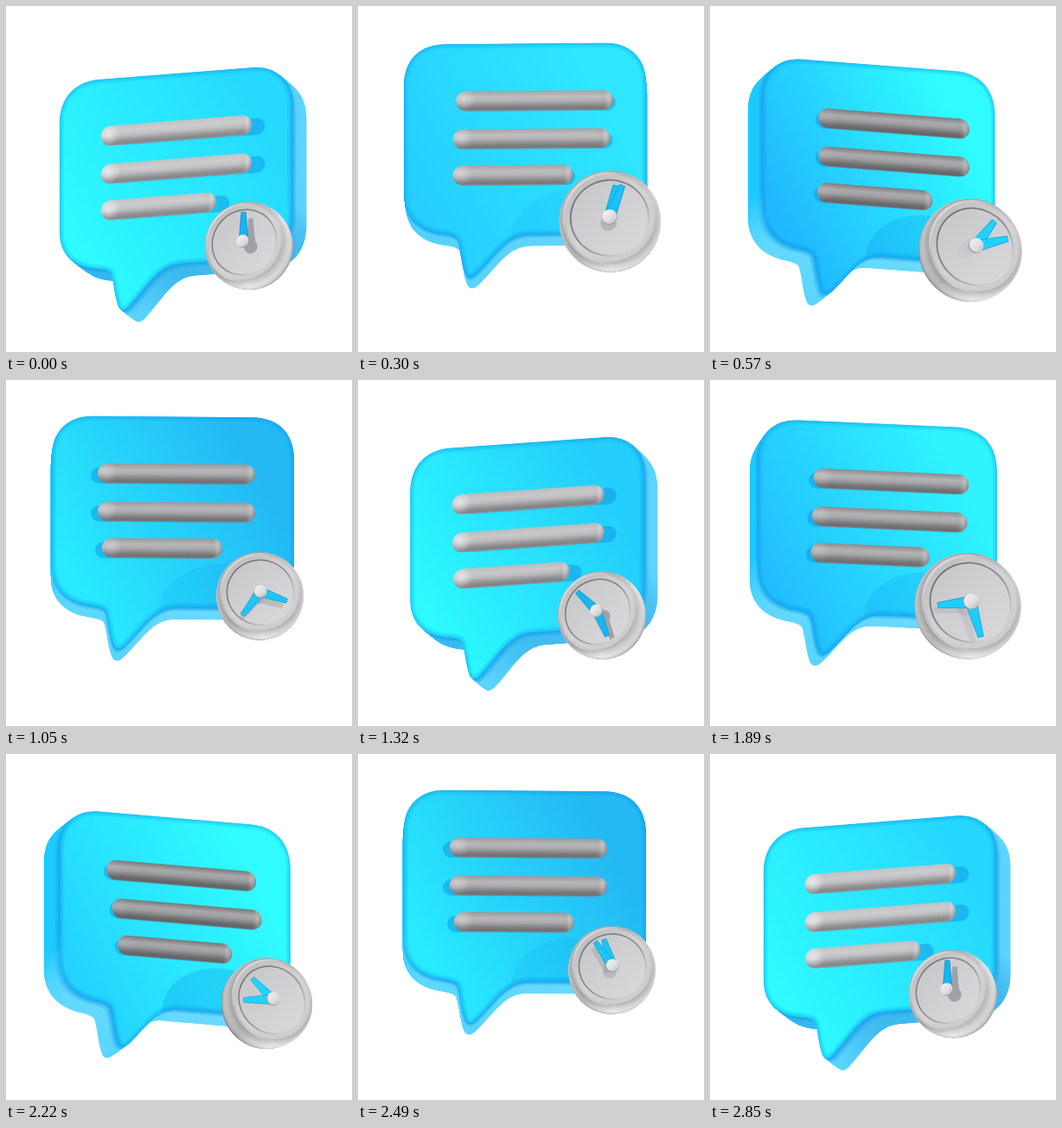
Recreate the animation shown at these times as an HTML page with a canvas. Size 400 by 400 pixels, loop 2.88 s.

```html
<!DOCTYPE html>
<html lang="en">
<head>
<meta charset="utf-8">
<title>Message with clock</title>
<style>
html, body { margin: 0; width: 100%; height: 100%; overflow: hidden; background: #fff; }
canvas { display: block; width: 400px; height: 400px; }
</style>
</head>
<body>
<canvas id="stage"></canvas>
<script>
const LOOP = 2880, SWING = 1440, DEG = Math.PI / 180;
const canvas = document.getElementById('stage');
const g = canvas.getContext('2d');
const ratio = Math.max(1, window.devicePixelRatio || 1);
canvas.width = canvas.height = 400 * ratio;

const times = [0, 150, 570, 780, 1050];
const barX = [[1, 6, 17.5, 7, 4], [1, 2, 17.5, 13.5, 4], [-19.5, -19, -4.5, -0.5, -12.5]];
const bars = [{ y: -44, half: 91 }, { y: 0, half: 91 }, { y: 42, half: 69.5 }];
// Face tints at the two ends of the diagonal, one channel per row.
const tintA = [[46, 42, 32, 36, 40], [250, 226, 184, 212, 234], [255, 255, 255, 255, 255]];
const tintB = [[38, 44, 48, 48, 36], [218, 220, 252, 252, 184], [255, 255, 255, 255, 244]];
const barLight = [200, 196, 166, 164, 178];

// Smooth periodic curve through the values at `times`.
function curve(v, p) {
  const n = times.length;
  const at = i => times[(i + n) % n] + Math.floor(i / n) * SWING;
  const val = i => v[(i + n) % n];
  let i = n - 1;
  while (p < times[i]) i--;
  const h = at(i + 1) - at(i), u = (p - at(i)) / h;
  const slope = j => (val(j + 1) - val(j - 1)) / (at(j + 1) - at(j - 1)) * h;
  const u2 = u * u, u3 = u2 * u;
  return val(i) * (2 * u3 - 3 * u2 + 1) + slope(i) * (u3 - 2 * u2 + u)
    + val(i + 1) * (3 * u2 - 2 * u3) + slope(i + 1) * (u3 - u2);
}

const rgb = c => `rgb(${c.map(v => Math.round(Math.max(0, Math.min(255, v)))).join(',')})`;
const gray = v => rgb([v, v, v + 2]);
const mix = (a, b, u) => a.map((v, i) => v + (b[i] - v) * u);

function ramp(x0, y0, x1, y1, stops) {
  const fill = g.createLinearGradient(x0, y0, x1, y1);
  for (const [at, color] of stops) fill.addColorStop(at, color);
  return fill;
}

function bubblePath() {
  const p = new Path2D();
  p.moveTo(-92, -110);
  p.lineTo(92, -110);
  p.bezierCurveTo(122, -110, 140, -92, 140, -62);
  p.lineTo(140, 62);
  p.bezierCurveTo(140, 92, 122, 110, 92, 110);
  p.lineTo(5, 110);
  p.bezierCurveTo(-22, 110, -34, 134, -56, 155);
  p.quadraticCurveTo(-65, 163, -69, 154);
  p.bezierCurveTo(-74, 140, -74, 127, -78, 115);
  p.quadraticCurveTo(-80, 111, -92, 109);
  p.bezierCurveTo(-122, 106, -140, 90, -140, 62);
  p.lineTo(-140, -62);
  p.bezierCurveTo(-140, -92, -122, -110, -92, -110);
  p.closePath();
  return p;
}
const bubble = bubblePath();

function disc(r, fill) {
  g.beginPath();
  g.ellipse(0, 0, r, r * 0.97, 0, 0, 7);
  g.fillStyle = fill;
  g.fill();
}

function capsule(x, y, half, r) {
  const p = new Path2D();
  p.roundRect(x - half, y - r, half * 2, r * 2, r);
  return p;
}

function poseAt(t) {
  const p = t % SWING, a = p / SWING * 360 + 5.5;
  const turn = Math.cos(a * DEG), yaw = (18 * turn - 1.2) * DEG;
  return {
    p, turn, sin: Math.sin(yaw), cos: Math.cos(yaw),
    x: 193 + 3 * turn * turn,
    y: 170.5 + 18 * Math.cos(2 * a * DEG)
  };
}

// Puts the local origin at a point of the tilted solid; z faces the viewer.
function place(m, x, y, z, scale = 1) {
  const tilt = -0.26 * m.sin;
  g.setTransform(ratio * m.cos * scale, ratio * tilt * scale, 0, ratio * scale,
    ratio * (m.x + x * m.cos - z * m.sin),
    ratio * (m.y + y + tilt * x - 0.23 * z));
}

function drawSides(m) {
  const depth = 63, layers = 48;
  const bevel = [24, 164, 234], tip = [110, 218, 255];
  const left = [28, 202, 255], right = [92, 212, 255];
  const under = mix([125, 222, 252], [52, 168, 228], Math.max(0, m.turn));
  for (let i = 0; i < layers; i++) {
    const u = i / layers, dark = Math.max(0, (u - 0.65) / 0.35);
    const tone = c => rgb(mix(c, bevel, dark));
    place(m, 0, 0, (u - 1) * depth, 1 - 0.006 * (1 - u) ** 4);
    g.fillStyle = ramp(-140, 0, 140, 0, [[0, tone(left)], [1, tone(right)]]);
    g.fill(bubble);
    const fade = under.map(Math.round).join(',');
    g.fillStyle = ramp(0, 45, 0, 160, [
      [0, `rgba(${fade},0)`], [0.5, tone(under)], [1, tone(tip)]
    ]);
    g.fill(bubble);
  }
}

function drawFace(m) {
  const a = rgb(tintA.map(v => curve(v, m.p))), b = rgb(tintB.map(v => curve(v, m.p)));
  place(m, 0, 0, 0);
  g.fillStyle = ramp(-125, 65, 95, -55, [[0, a], [1, b]]);
  g.fill(bubble);

  g.save();
  g.clip(bubble);
  const side = 1 - m.turn;
  g.fillStyle = `rgba(12,150,232,${0.15 * side})`;
  g.beginPath();
  g.ellipse(50, 108, 66, 48, -0.15, 0, 7);
  g.fill();
  g.strokeStyle = 'rgba(14,146,232,.13)';
  for (const w of [10, 7, 4, 2]) {
    g.lineWidth = w;
    g.stroke(bubble);
  }
  g.restore();
}

function drawBars(m) {
  const light = curve(barLight, m.p);
  bars.forEach((bar, i) => {
    const x = curve(barX[i], m.p) / m.cos;
    place(m, 0, 0, 0);
    const lean = m.turn > 0 ? 16 * m.turn : -8 + 5 * -m.turn;
    g.fillStyle = 'rgba(10,140,224,.45)';
    g.fill(capsule(x + lean, bar.y + 2.5, bar.half, 9.5));

    const top = bar.y - 11.5, end = bar.y + 11.5;
    const body = capsule(x, bar.y, bar.half, 11.5);
    const shade = 25 - 20 * m.turn;
    g.fillStyle = ramp(0, top, 0, end, [
      [0, gray(light - shade)], [0.3, gray(light + 5)], [0.5, gray(light - 6)],
      [0.8, gray(light - 56)], [0.93, gray(light - 66)], [1, gray(light - 40)]
    ]);
    g.fill(body);

    const left = x - bar.half;
    const glow = g.createRadialGradient(left + 9, bar.y - 2, 1, left + 9, bar.y - 2, 14);
    const strength = 0.35 + 0.3 * m.turn;
    glow.addColorStop(0, `rgba(245,245,250,${strength})`);
    glow.addColorStop(1, 'rgba(245,245,250,0)');
    g.fillStyle = glow;
    g.fill(body);
    g.fillStyle = ramp(x + bar.half - 14, 0, x + bar.half, 0, [
      [0, 'rgba(110,110,115,0)'], [0.6, 'rgba(235,235,240,.25)'], [1, 'rgba(110,110,115,.45)']
    ]);
    g.fill(body);
  });
}

function hand(angle, length, fill, edge) {
  g.save();
  g.rotate(angle * DEG);
  g.beginPath();
  g.moveTo(-5.5, 0);
  g.lineTo(-2.6, -length);
  g.lineTo(2.6, -length);
  g.lineTo(5.5, 0);
  g.closePath();
  g.fillStyle = fill;
  g.fill();
  if (edge) {
    g.lineWidth = 0.8;
    g.strokeStyle = edge;
    g.stroke();
  }
  g.restore();
}

function drawClock(m, t) {
  const x = 99.5, y = 105, z = 55, depth = 37;
  const size = 1 + (m.p < 900 ? 0.22 * Math.sin(m.p / 900 * Math.PI) ** 2 : 0);
  const at = (dz, dx = 0, dy = 0) => place(m, x + dx, y + dy, z + dz, size);

  const layers = 36;
  for (let i = 0; i < layers; i++) {
    const u = i / layers, v = 140 + 66 * Math.sin(u * 2.6);
    const bevel = 3 * (1 - u) ** 4 + 3.5 * u ** 6;
    at((u - 1) * depth);
    disc(50.5 - bevel, ramp(-48, -20, 48, 30, [
      [0, gray(v - 10)], [0.35, gray(v - 22)], [0.7, gray(v + 26)], [1, gray(v)]
    ]));
  }

  at(0);
  disc(47, ramp(-35, -38, 35, 38, [
    [0, gray(224)], [0.3, gray(186)], [0.65, gray(206)], [1, gray(178)]
  ]));
  disc(44.5, ramp(-30, -36, 30, 36, [[0, gray(190)], [0.5, gray(212)], [1, gray(204)]]));
  disc(39.5, ramp(-30, -30, 30, 30, [[0, gray(112)], [0.55, gray(140)], [1, gray(225)]]));
  disc(38, ramp(-30, -30, 30, 30, [[0, gray(200)], [1, gray(216)]]));

  const u = t / LOOP, eased = u * u * (3 - 2 * u);
  const minute = 720 * eased, hour = 360 * eased;
  const shade = `rgba(160,160,170,${0.5 + 0.5 * m.turn})`;
  g.save();
  g.beginPath();
  g.arc(0, 0, 37, 0, 7);
  g.clip();
  at(0, 11 * m.turn - 3, 6);
  hand(hour, 31, shade);
  hand(minute, 33, shade);
  disc(8, shade);
  g.restore();

  const blue = mix([32, 214, 252], [24, 180, 240], 0.5 + 0.5 * m.turn);
  const edge = rgb(mix(blue, [20, 120, 180], 0.45));
  at(3);
  hand(hour, 32, rgb(blue), edge);
  hand(minute, 34, rgb(blue), edge);
  at(4);
  disc(7.6, gray(158));
  at(7);
  disc(7.3, ramp(-5, -5, 5, 6, [[0, gray(240)], [0.6, gray(222)], [1, gray(196)]]));
}

function draw(t) {
  g.setTransform(ratio, 0, 0, ratio, 0, 0);
  g.fillStyle = '#fff';
  g.fillRect(0, 0, 400, 400);
  const m = poseAt(t);
  drawSides(m);
  drawFace(m);
  drawBars(m);
  drawClock(m, t);
}

const start = performance.now();
function tick() {
  draw((performance.now() - start) % LOOP);
  requestAnimationFrame(tick);
}
tick();
</script>
</body>
</html>
```
